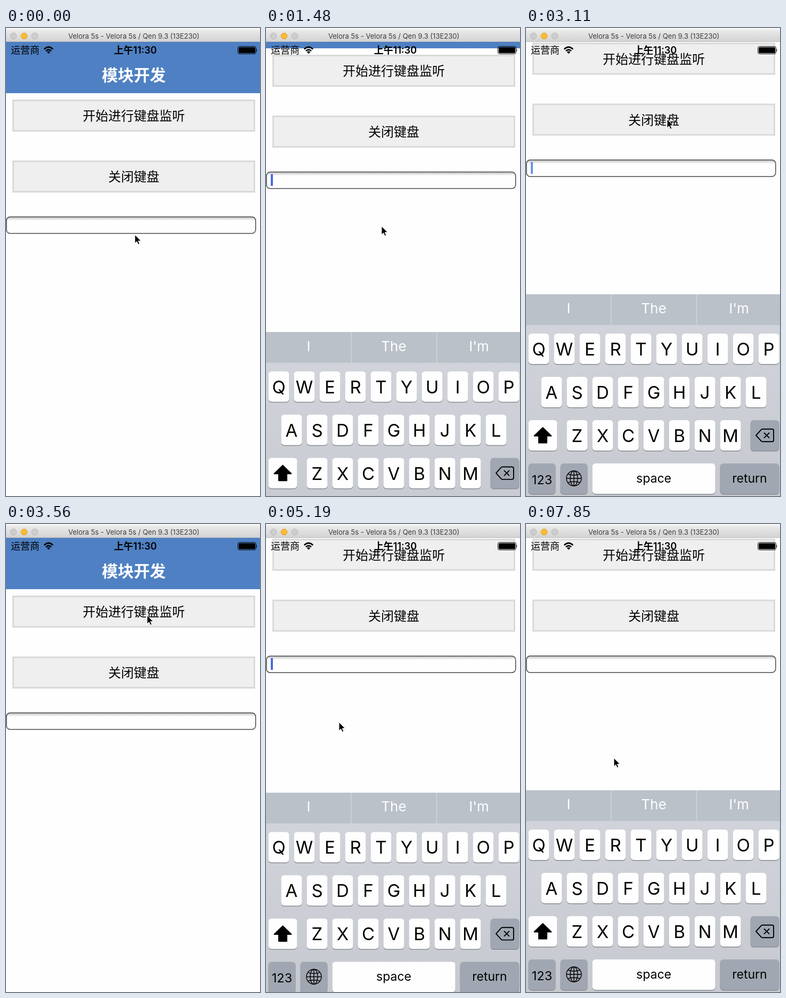
Write an HTML page that moves like this. It is 477 by 876 pixels and loops after 7.99 s.

```html
<!DOCTYPE html>
<html lang="zh">
<head>
<meta charset="utf-8">
<title>Keyboard demo</title>
<style>
  html, body { margin: 0; width: 100%; height: 100%; overflow: hidden; background: #fefefe; }
  svg { display: block; width: 477px; height: 876px; }
  text { font-family: Inter, "Noto Sans CJK SC", "Noto Sans CJK", sans-serif; }
  .cjk { font-family: "Noto Sans CJK SC", "Noto Sans CJK", "Noto Sans", sans-serif; }
  .mid { text-anchor: middle; }
</style>
</head>
<body>
<svg viewBox="0 0 477 876">
  <defs>
    <linearGradient id="bar" x2="0" y2="1">
      <stop stop-color="#ebebeb"/><stop offset="1" stop-color="#d2d2d2"/>
    </linearGradient>
    <linearGradient id="board" x2="0" y2="1">
      <stop stop-color="#d2d5dc"/><stop offset="1" stop-color="#c6c9cf"/>
    </linearGradient>
    <linearGradient id="inset" x2="0" y2="1">
      <stop stop-color="#bdbdbd"/><stop offset=".22" stop-color="#fefefe"/>
    </linearGradient>
  </defs>
  <rect width="477" height="876" fill="#fefefe"/>

  <g id="page">
    <rect y="26" width="477" height="96" fill="#4e80c3"/>
    <text class="cjk mid" x="240" y="98.5" font-size="30" font-weight="700" fill="#fff">模块开发</text>
    <g id="buttons"></g>
    <rect x=".8" y="353.6" width="468" height="31" rx="7" fill="url(#inset)" stroke="#484848" stroke-width="1.5"/>
    <rect id="caret" x="9" y="357.5" width="4" height="22" fill="#426be8"/>
    <rect id="tap" x="-4" y="349" width="477" height="41" rx="9" fill="#1a1a1a" fill-opacity=".3"/>
  </g>

  <g id="status">
    <text class="cjk" x="9" y="48" font-size="18">运营商</text>
    <g fill="none" stroke="#000" stroke-width="2.6">
      <path d="M71.8 39.6Q80 31.6 88.2 39.6M75 43Q80 38.2 85 43"/>
    </g>
    <path d="M80 48.2L76.9 45Q80 42.2 83.1 45Z"/>
    <text class="mid" x="243" y="48" font-size="18" font-weight="600"><tspan class="cjk" font-weight="700">上午</tspan>11:30</text>
    <rect x="435.5" y="34.5" width="34" height="14" rx="3" fill="none" stroke="#000"/>
    <rect x="437" y="36" width="31" height="11" rx="1.5"/>
    <path d="M470.5 39Q472.5 41.5 470.5 44Z"/>
  </g>

  <g id="keyboard"></g>

  <g id="window">
    <rect width="477" height="4" fill="#f6f6f6"/>
    <rect y="3" width="477" height="23" fill="url(#bar)"/>
    <rect y="25" width="477" height="1" fill="#bcbcbc"/>
    <g fill="#cecece" stroke="#b4b4b4">
      <circle cx="14" cy="15" r="5.7"/>
      <circle cx="34" cy="15" r="5.7" fill="#fbbc2e" stroke="#e0a124"/>
      <circle cx="54" cy="15" r="5.7"/>
    </g>
    <text class="mid" x="240" y="20" font-size="13" fill="#3c3c3c">Velora 5s - Velora 5s / Qen 9.3 (13E230)</text>
  </g>

  <path id="pointer" d="M0 0V16L3.7 12.6L6.2 18.2L8.8 17.1L6.4 11.6H11.4Z" stroke="#fff" stroke-width="1"/>
</svg>

<script>
const el = id => document.getElementById(id);

const button = (y, label) => `
  <rect x="13.5" y="${y + 1.5}" width="453" height="57" fill="#efefef" stroke="#d9d9d9" stroke-width="3"/>
  <text class="cjk mid" x="240" y="${y + 39}" font-size="24">${label}</text>`;
el('buttons').innerHTML = button(134, '开始进行键盘监听') + button(248, '关闭键盘');

// Keyboard geometry is relative to its own top edge.
const rowY = row => 73.5 + 81 * row;
const key = (x, row, width, fill = '#fefefe') => `
  <rect x="${x}" y="${rowY(row) + 1.6}" width="${width}" height="57" rx="6" fill="#888b91"/>
  <rect x="${x}" y="${rowY(row)}" width="${width}" height="57" rx="6" fill="${fill}"/>`;
const label = (x, y, size, text, fill = '#000') =>
  `<text class="mid" x="${x}" y="${y}" font-size="${size}" fill="${fill}">${text}</text>`;
const letters = (chars, x, row) => [...chars].map((c, i) =>
  key(x + 48 * i, row, 39) + label(x + 48 * i + 19.5, rowY(row) + 41, 33, c)).join('');
const GREY = '#a1a7b2';

el('keyboard').innerHTML = `
  <rect width="477" height="380" fill="url(#board)"/>
  <rect width="477" height="57.5" fill="#bac1c9"/>
  <path d="M160 0V57.5M320.5 0V57.5" stroke="#d3d7dc" stroke-width="1.3"/>
  ${['I', 'The', "I'm"].map((word, i) => label(80 + 160 * i, 35.5, 26, word, '#fff')).join('')}
  ${letters('QWERTYUIOP', 4.5, 0)}
  ${letters('ASDFGHJKL', 28.5, 1)}
  ${letters('ZXCVBNM', 76.5, 2)}
  ${key(4.5, 2, 54)}
  <path d="M31.5 249.5L47.5 265H39V278H24V265H15.5Z" stroke="#000" stroke-width="2" stroke-linejoin="round"/>
  ${key(421.5, 2, 54, GREY)}
  <path d="M432 264L441.5 253.5Q442.5 252.3 444 252.3H462Q465 252.3 465 255.3V272.7Q465 275.7 462 275.7H444Q442.5 275.7 441.5 274.5ZM447 259L457 269M457 259L447 269"
    fill="none" stroke="#000" stroke-width="1.9" stroke-linejoin="round"/>
  ${key(4.5, 3, 51, GREY)}${label(30, 355, 23.5, '123')}
  ${key(64.5, 3, 51, GREY)}
  <g transform="translate(90 344.5)" fill="none" stroke="#000" stroke-width="1.4">
    <circle r="14"/><ellipse rx="7" ry="14"/>
    <path d="M0-14V14M-14 0H14M-11.5-8Q0-4 11.5-8M-11.5 8Q0 4 11.5 8"/>
  </g>
  ${key(124.5, 3, 231)}${label(240, 352.5, 23, 'space')}
  ${key(364.5, 3, 111, GREY)}${label(420, 352.5, 23, 'return')}`;

const LOOP = 7990, STEPS = 54, STEP = LOOP / STEPS;

// Pointer stops: step, x, y
const stops = [
  [0, 242, 387], [3, 217, 371], [10, 217, 371], [13, 326, 511], [16, 371, 553],
  [19, 262, 193], [20, 262, 193], [21, 265, 171], [24, 265, 171], [29, 137, 371],
  [35, 137, 371], [42, 170, 470], [45, 234, 490], [48, 377, 497], [50, 333, 496],
  [53, 165, 438]
];

function pointerAt(step) {
  const i = Math.max(1, stops.findIndex(s => s[0] >= step));
  const [a, b] = [stops[i - 1], stops[i]];
  const f = (step - a[0]) / (b[0] - a[0]);
  return [1, 2].map(n => a[n] + (b[n] - a[n]) * f);
}

const within = (step, from, to) => step >= from && step < to;
const clamp = v => Math.min(1, Math.max(0, v));

// Critically damped spring from 0 to 1
const spring = s => 1 - (1 + 18 * s) * Math.exp(-18 * s);

function caretAlpha(s) {
  const phase = s % 1;
  if (s < 0.75) return 1;
  return phase < 0.6 ? clamp((phase - 0.3) / 0.2) : clamp((0.95 - phase) / 0.2);
}

function draw(ms) {
  const step = Math.min(STEPS - 1, Math.floor((ms % LOOP + 8) / STEP));
  const focused = within(step, 9, 24) || step >= 35;
  const since = step * STEP / 1000 - (step < 24 ? 1.308 : 4.82);
  const open = focused ? spring(since) : 0;
  const scroll = 106.5 * Math.min(1, 1.014 * open ** 1.22);

  el('page').setAttribute('transform', `translate(0 ${-scroll})`);
  el('keyboard').setAttribute('transform', `translate(0 ${878 - 379.5 * open})`);
  el('caret').setAttribute('opacity', focused ? caretAlpha(since) : 0);
  el('tap').setAttribute('opacity', within(step, 7, 9) || within(step, 33, 35) ? 1 : 0);
  el('pointer').setAttribute('transform', `translate(${pointerAt(step)})`);
}

const start = performance.now();
function tick() {
  draw(performance.now() - start);
  requestAnimationFrame(tick);
}
tick();
</script>
</body>
</html>
```
